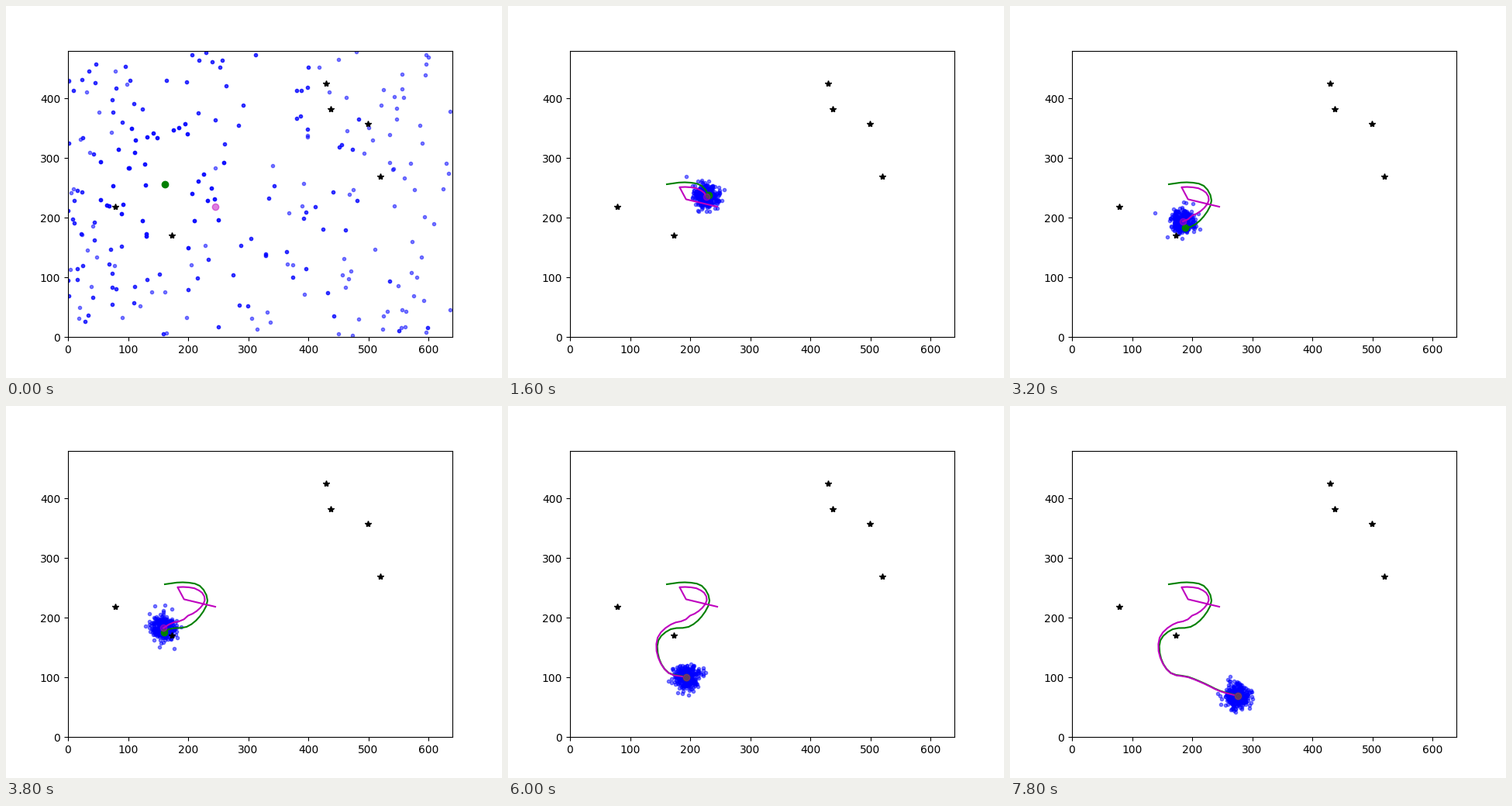
Write a matplotlib script that moves like this. It is 640 px wide and 480 px high and loops after 8000 ms.

```python
import numpy as np
import matplotlib.pyplot as plt
from matplotlib.animation import FuncAnimation

FRAMES = 40
STEP_MS = 200
rng = np.random.default_rng(12)


def to_axes(points):
    """Stage pixels (y down) to plot units."""
    p = np.atleast_2d(points)
    return (p[:, 0] - 80) / 0.775, (427.2 - p[:, 1]) / 0.77


def smooth_path(keys, every):
    """Catmull-Rom curve through keys that are `every` frames apart."""
    k = np.array(keys, float)
    k = np.vstack([2 * k[0] - k[1], k, 2 * k[-1] - k[-2]])
    t = np.arange(FRAMES) / every
    i = np.minimum(t.astype(int), len(keys) - 2)
    u = (t - i)[:, None]
    a, b, c, d = (k[i + n] for n in range(4))
    return b + u / 2 * (c - a + u * (2 * a - 5 * b + 4 * c - d
                                     + u * (3 * (b - c) + d - a)))


landmarks = np.array([(79, 218), (172.5, 170), (430, 425),
                      (437.5, 382), (499, 357), (520, 269)])

robot = smooth_path([(205, 230), (228, 227.5), (250, 232), (260, 251),
                     (250, 271.5), (233, 285), (210, 288), (194, 302.5),
                     (195, 326), (207.5, 344.5), (230, 349.5), (251, 358),
                     (271, 367.5), (293.5, 373.5)], every=3)

# The estimate's error shrinks quickly, then fades out along the way
error_time = (0, 1, 2, 6, 9, 14, 18, 23, 28)
error_x = (65, 17, 1, -1, -3.5, -4.5, 0, -1.5, 0)
error_y = (29, 20.5, 6, 6, -0.5, -11, -6, -2, 0.5)
frame = np.arange(FRAMES)
estimate = robot + np.column_stack([np.interp(frame, error_time, error_x),
                                    np.interp(frame, error_time, error_y)])


def first_cloud():
    """Particles all over the stage, doubled up towards the robot."""
    u, v = rng.random((2, 240))
    cloud = np.column_stack([80 + 496 * u ** 1.3, 58 + 369 * v])
    dist = np.hypot(*(cloud - robot[0]).T)
    heavy = rng.random(len(cloud)) < np.exp(-(dist / 250) ** 2)
    return np.repeat(cloud, 1 + heavy + (heavy & (dist < 90)), axis=0)


def resample(cloud, weight):
    n = len(cloud)
    marks = (np.arange(n) + rng.random()) / n
    total = np.cumsum(weight) / weight.sum()
    return cloud[np.minimum(np.searchsorted(total, marks), n - 1)]


def run_filter():
    clouds = [first_cloud()]
    for t in range(1, FRAMES):
        path = robot if t < 4 else estimate
        cloud = clouds[-1] + path[t] - path[t - 1]
        cloud = cloud + 4.5 * rng.standard_t(3, cloud.shape)
        spread = 10 + 30 * np.exp(1 - t)
        dist2 = ((cloud - estimate[t]) ** 2).sum(axis=1)
        clouds.append(resample(cloud, (1 + dist2 / (5 * spread ** 2)) ** -2.5))
    return clouds


clouds = run_filter()

fig, ax = plt.subplots(figsize=(6.4, 4.8), dpi=100)
ax.set_xlim(0, 640)
ax.set_ylim(0, 480)
particles, = ax.plot([], [], "b.", alpha=0.5)
ax.plot(*landmarks.T, "k*")
robot_line, = ax.plot([], [], "g-")
guess_line, = ax.plot([], [], "m-")
robot_dot, = ax.plot([], [], "go")
guess_dot, = ax.plot([], [], "mo", alpha=0.5)


def draw(t):
    particles.set_data(*to_axes(clouds[t]))
    robot_line.set_data(*to_axes(robot[:t + 1]))
    guess_line.set_data(*to_axes(estimate[:t + 1]))
    robot_dot.set_data(*to_axes(robot[t]))
    guess_dot.set_data(*to_axes(estimate[t]))
    return particles, robot_line, guess_line, robot_dot, guess_dot


anim = FuncAnimation(fig, draw, frames=FRAMES, interval=STEP_MS,
                     repeat=True, repeat_delay=0)
plt.show()
```
